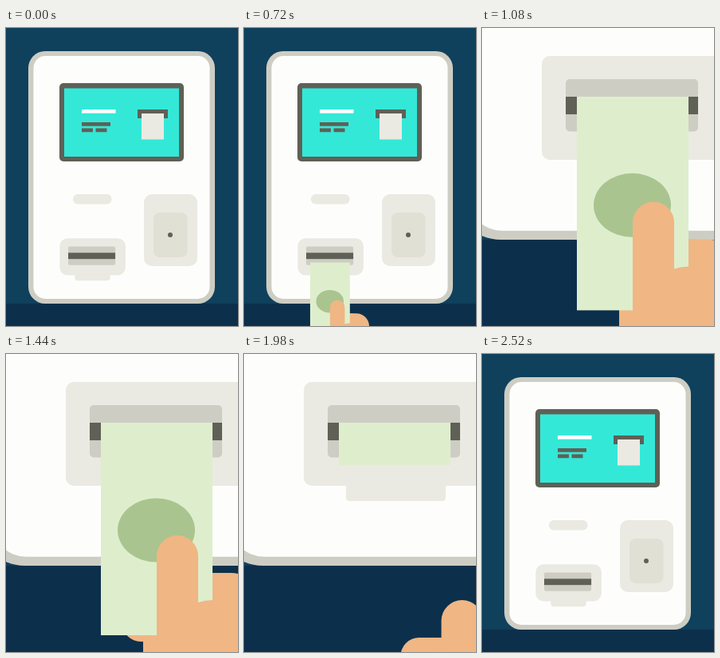
Animation, 291 px wide and 373 px high, one loop 2700 ms. Source, as an HTML page:

```html
<!DOCTYPE html>
<html>
<head>
<meta charset="utf-8">
<title>Cash machine</title>
<style>
  html, body { margin: 0; width: 100%; height: 100%; overflow: hidden; background: #0f405c; }
  svg { display: block; width: 100vw; height: 100vh; }
  .dark { fill: #5f6056; }
  .grey { fill: #cecdc3; }
  .pale { fill: #eaeae2; }
  .white { fill: #fdfefc; }
  .skin { fill: #f0b684; }
  .panel { rx: 28px; }
  .tab { rx: 11px; }
  .near .panel { rx: 10px; }
  .near .tab { rx: 4px; }
  .near .face { height: 306px; }
</style>
</head>
<body>
<svg id="stage" viewBox="0 0 291 373">
  <clipPath id="mouth"><rect x="0" y="86" width="400" height="900"/></clipPath>

  <rect y="345" width="291" height="60" fill="#0c304b"/>
  <rect class="grey" x="28" y="29" width="234" height="316" rx="21"/>
  <rect class="white face" x="34.5" y="35" width="221" height="304" rx="15"/>

  <!-- screen -->
  <rect class="dark" x="67" y="69" width="156" height="98" rx="5"/>
  <rect x="73" y="75.5" width="144" height="85.5" fill="#34e8d8"/>
  <rect class="white" x="95" y="102" width="42.5" height="4.7"/>
  <path class="dark" d="M95 118h36v4.7h-36zM95 125.5h14v4.7h-14zM112.5 125.5h14v4.7h-14zM165 102h38v11h-38z"/>
  <rect class="pale" x="170" y="107" width="28" height="32.5"/>

  <!-- card slot and reader -->
  <rect class="pale" x="84" y="208" width="48.5" height="12.5" rx="6"/>
  <rect class="pale" x="173" y="208" width="67" height="90" rx="10"/>
  <rect x="185" y="231" width="42.5" height="56" rx="8" fill="#e0e0d5"/>
  <circle class="dark" cx="206" cy="259" r="3"/>

  <!-- cash slot, in close-up units -->
  <g transform="translate(40.63 250.72) scale(.3559)">
    <rect class="pale tab" x="128" y="140" width="125" height="44"/>
    <rect class="pale panel" x="75" y="35" width="232" height="130"/>
    <rect class="grey" x="105" y="64" width="166" height="65.5" rx="5"/>
    <rect class="dark" x="105" y="86" width="166" height="22"/>

    <g class="hand skin">
      <rect x="138" y="274" width="150" height="46" rx="23"/>
      <rect x="146" y="314" width="150" height="46" rx="23"/>
      <rect x="172" y="354" width="150" height="46" rx="23"/>
      <rect x="172" y="274" width="155" height="300" rx="45"/>
    </g>
    <g clip-path="url(#mouth)">
      <g id="bill">
        <rect x="119" width="140" height="268" fill="#deeecd"/>
        <ellipse cx="188.5" cy="136.5" rx="48.5" ry="40" fill="#aac48f"/>
      </g>
    </g>
    <g class="hand skin">
      <path d="M189 574V253a26 26 0 0 1 52 0v58q9-3 18-3h40V574z"/>
    </g>
  </g>
</svg>
<script>
  const STEP = 180, COUNT = 15, REST = 84, GRAB = 7, RELEASE = 8;
  const stage = document.getElementById('stage');
  const bill = document.getElementById('bill');
  const hands = document.querySelectorAll('.hand');
  const move = (el, x, y) => el.setAttribute('transform', `translate(${x} ${y})`);

  function draw(k) {
    const near = k > 4 && k < 14;
    stage.classList.toggle('near', near);
    stage.setAttribute('viewBox', near ? '40.63 250.72 103.56 132.74' : '0 0 291 373');

    // the bill eases up to the slot, then gets pulled in while the hand drops away
    const shown = k > 1 && k < 13;
    const rise = 1.35 * Math.max(0, GRAB - k) ** 3;
    const n = Math.max(0, k - RELEASE);
    move(bill, 0, shown ? REST + rise - 41 * n ** 1.5 : 900);

    const drop = k < RELEASE ? rise - 10.8 : 9 * n * n;
    hands.forEach(h => move(h, 6.5 * n * n, shown ? drop : 900));
  }

  const start = performance.now();
  function tick() {
    draw(Math.floor((performance.now() - start) / STEP) % COUNT);
    requestAnimationFrame(tick);
  }
  tick();
</script>
</body>
</html>
```
